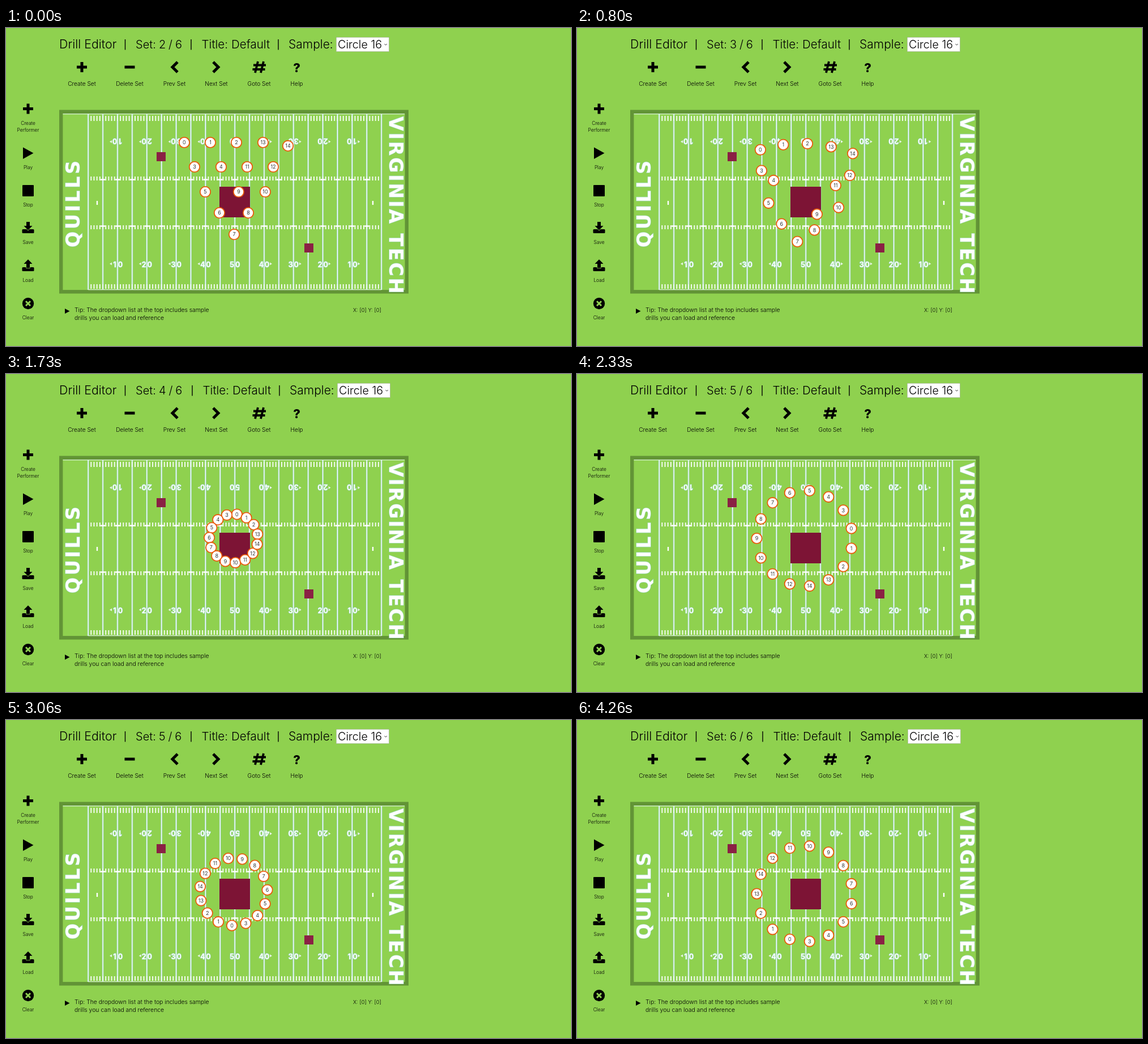
Recreate the animation shown at these times as an HTML page. Size 998 by 561 pixels, loop 4.32 s.

```html
<!DOCTYPE html>
<html lang="en">
<head>
<meta charset="utf-8">
<title>Drill Editor</title>
<style>
html, body { margin: 0; width: 100%; height: 100%; overflow: hidden; background: #8fd14f; }
svg { display: block; font-family: Inter, "Open Sans", sans-serif; font-weight: 300; }
.mid { text-anchor: middle; }
.paint { fill: #fff; stroke: #9ad8b4; stroke-width: 1.4; paint-order: stroke; font-weight: 700; }
.zone { font-family: "DejaVu Sans", sans-serif; }
.bar { fill: none; stroke: #000; stroke-width: 5; }
</style>
</head>
<body>
<svg id="stage" width="998" height="561" viewBox="0 0 998 561"></svg>
<script>
const stage = document.getElementById('stage');
const text = (x, y, size, label, attrs = '') =>
  `<text x="${x}" y="${y}" font-size="${size}" ${attrs}>${label}</text>`;
const mid = (x, y, size, label) => text(x, y, size, label, 'class="mid"');
const path = (d, attrs = '') => `<path d="${d}" ${attrs}/>`;
const rect = (x, y, w, h, attrs = '') =>
  `<rect x="${x}" y="${y}" width="${w}" height="${h}" ${attrs}/>`;
const plus = (x, y) => path(`M${x - 9} ${y}h18M${x} ${y - 9}v18`, 'class="bar"');

function header() {
  const pipe = x => path(`M${x} 20v18.5`, 'stroke="#000" stroke-width="1.4"');
  return text(94, 36, 21.4, 'Drill Editor') + pipe(210.5) + text(229, 36, 20, 'Set:') +
    text(270, 36, 20, '<tspan id="set">2</tspan> / 6', 'letter-spacing="-.4"') +
    '<g id="tail">' + pipe(327) + text(345.5, 36, 20.6, 'Title: Default') +
    pipe(481) + text(499, 36, 21, 'Sample:') +
    rect(583.3, 16.3, 93.4, 25.4, 'fill="#fff" stroke="#97a886" stroke-width=".6"') +
    text(586, 36, 19.8, 'Circle 16') +
    path('M668.5 28l2.2 2.2 2.2-2.2', 'fill="none" stroke="#333"') + '</g>';
}

function toolbar() {
  const labels = [[134, 'Create'], [218.5, 'Delete'], [297.5, 'Prev'], [371.5, 'Next'], [447, 'Goto']];
  return labels.map(([x, word]) => mid(x, 102.3, 10.2, word + ' Set')).join('') +
    mid(513.5, 102.3, 10.2, 'Help') + plus(134, 69) + path('M209.5 69h18', 'class="bar"') +
    path('M303 60l-9 9 9 9M366 60l9 9-9 9', 'class="bar"') +
    path('M445 59l-5 20M455 59l-5 20M437 65.5h22M435.5 73h22', 'class="bar" style="stroke-width:3.8"') +
    text(513.5, 77.5, 22, '?', 'class="mid" font-weight="800"');
}

function sidebar() {
  const labels = [[171, 'Create'], [183, 'Performer'], [249, 'Play'], [315, 'Stop'],
    [381, 'Save'], [447.5, 'Load'], [514, 'Clear']];
  const tray = y => rect(28.5, y, 21, 7, 'rx="1.5"');
  const green = 'stroke="#8fd14f" stroke-width="1.4" paint-order="stroke"';
  return labels.map(([y, word]) => mid(39, y, 8.3, word)).join('') + plus(39, 142.5) +
    path('M30 210.5l18.5 10.2L30 231z') + rect(29, 277, 20, 20, 'rx="1"') +
    tray(355) + path('M36 342h6v7h4.5l-7.5 7.7-7.5-7.7h4.5z', green) +
    tray(422) + path('M36 423.5v-7.5h-4.5l7.5-7.7 7.5 7.7h-4.5v7.5z', green) +
    '<circle cx="39" cy="486" r="10.2"/>' +
    path('M35 482l8 8M43 482l-8 8', 'stroke="#8fd14f" stroke-width="3"');
}

function yardNumbers() {
  let out = '';
  for (let i = 1; i < 10; i++) {
    const x = 145.2 + i * 51.8, side = Math.sign(i - 5);
    const ten = 5 - Math.abs(i - 5);
    out += text(x - 5, 421.5, 12.5, ten, 'class="mid paint"') +
      text(x + 5, 421.5, 12.5, 0, 'class="mid paint"');
    if (side) out += path(`M${x + side * 10} 413.5v5l${side * 4}-2.5z`, 'fill="#e6f6ea"');
  }
  return out;
}

function field() {
  const yards = Array.from({length: 21}, (_, i) => 145.2 + i * 25.9);
  const lines = yards.map(x => `M${x} 151V462`).join('');
  const bars = yards.slice(1, -1).map(x => `M${x - 4} 267.5h8M${x - 4} 349.5h8`).join('');
  const hash = [[155, 9], [262, 7], [348, 7], [452, 8]].map(([y, h]) =>
    path(`M149.3 ${y + h / 2}H661`, `stroke="#f2fbf0" stroke-width="${h}" stroke-dasharray="2 3.18"`)).join('');
  const numbers = yardNumbers();
  return rect(97.2, 147.7, 610.6, 317.6, 'fill="none" stroke="#629436" stroke-width="6.4"') +
    path(lines, 'stroke="#93d3ae" stroke-width="3"') +
    path(lines, 'stroke="#fff" stroke-width="1.3"') +
    path('M100.5 151.7H704M145 461.7H663', 'stroke="#d5f0d3" stroke-width="1.3"') +
    hash + path(bars + 'M161 305v7M648 305v7', 'stroke="#fff" stroke-width="2.4"') +
    numbers + `<g transform="rotate(180 404.2 308.3)">${numbers}</g>` +
    text(0, 0, 33, 'QUILLS', 'class="paint zone" letter-spacing="4" transform="translate(130 387) rotate(-90)"') +
    text(0, 0, 33, 'VIRGINIA TECH', 'class="paint zone" letter-spacing="3" transform="translate(677 156) rotate(90)"') +
    rect(377, 280, 54, 54, 'fill="#7d1435"') +
    rect(266, 219, 16, 16, 'fill="#8a2144"') + rect(527, 380, 16, 16, 'fill="#8a2144"');
}

function footer() {
  return path('M104 495l8.5 4.5-8.5 4.5z') +
    text(121, 500.5, 10.4, 'Tip: The dropdown list at the top includes sample') +
    text(121, 515, 10.4, 'drills you can load and reference') +
    text(613, 500.5, 9.4, 'X: [0] Y: [0]');
}

// Formations: one [x, y] per performer
const opening = [[315, 202], [361, 202], [407, 202], [333, 245], [380, 245], [352, 289], [377, 326],
  [403, 364], [428, 326], [411, 289], [458, 289], [426, 245], [472, 245], [454, 202], [498, 208]];
const triangle = [];
[[0, 1, 2, 13, 14], [3, 4, 11, 12], [5, 9, 10], [6, 8], [7]].forEach((row, i) =>
  row.forEach((id, j) => {
    triangle[id] = [403 + (j - (row.length - 1) / 2) * 50.6, 202 + 45.4 * i];
  }));
function ring(startDeg, cy) {
  const spots = [];
  [0, 1, 2, 13, 14, 12, 11, 10, 9, 8, 7, 6, 5, 4, 3].forEach((id, i) => {
    const a = (startDeg + i * 24) * Math.PI / 180;
    spots[id] = [402 + 84.5 * Math.sin(a), cy - 84.5 * Math.cos(a)];
  });
  return spots;
}

const LOOP = 4320, MOVE = 1000;
const starts = [-700, 297, 1264, 2366];
const swing = p => 0.5 - Math.cos(Math.PI * Math.min(1, p)) / 2;
const mix = (a, b, f) => a.map((v, i) => v + (b[i] - v) * f);
// The loop opens partway through the first move, so extend it back to its start
const back = 1 / (1 - swing(-starts[0] / MOVE));
const formations = [triangle.map((p, i) => mix(p, opening[i], back)), triangle,
  ring(318, 290), ring(78, 290), ring(198, 306.5)];

stage.innerHTML = header() + toolbar() + sidebar() + field() + footer() +
  opening.map((_, i) => `<g class="dot"><circle r="9.2" fill="#fff" stroke="#ea5b0c" stroke-width="1.8"/>${
    mid(0, 3.2, 9.2, i)}</g>`).join('');
const dots = stage.querySelectorAll('.dot');
const setLabel = document.getElementById('set'), tail = document.getElementById('tail');
const shifts = {4: 2, 6: 1};

function draw(now) {
  const t = now % LOOP;
  const leg = starts.filter(s => t >= s).length - 1;
  const f = swing((t - starts[leg]) / MOVE);
  dots.forEach((dot, i) => {
    const [x, y] = mix(formations[leg][i], formations[leg + 1][i], f);
    dot.setAttribute('transform', `translate(${x} ${y})`);
  });
  const set = 2 + starts.filter(s => t >= s + MOVE).length;
  setLabel.textContent = set;
  tail.setAttribute('transform', `translate(${shifts[set] || 0} 0)`);
}

const began = performance.now();
function tick() {
  draw(performance.now() - began);
  requestAnimationFrame(tick);
}
tick();
</script>
</body>
</html>
```
